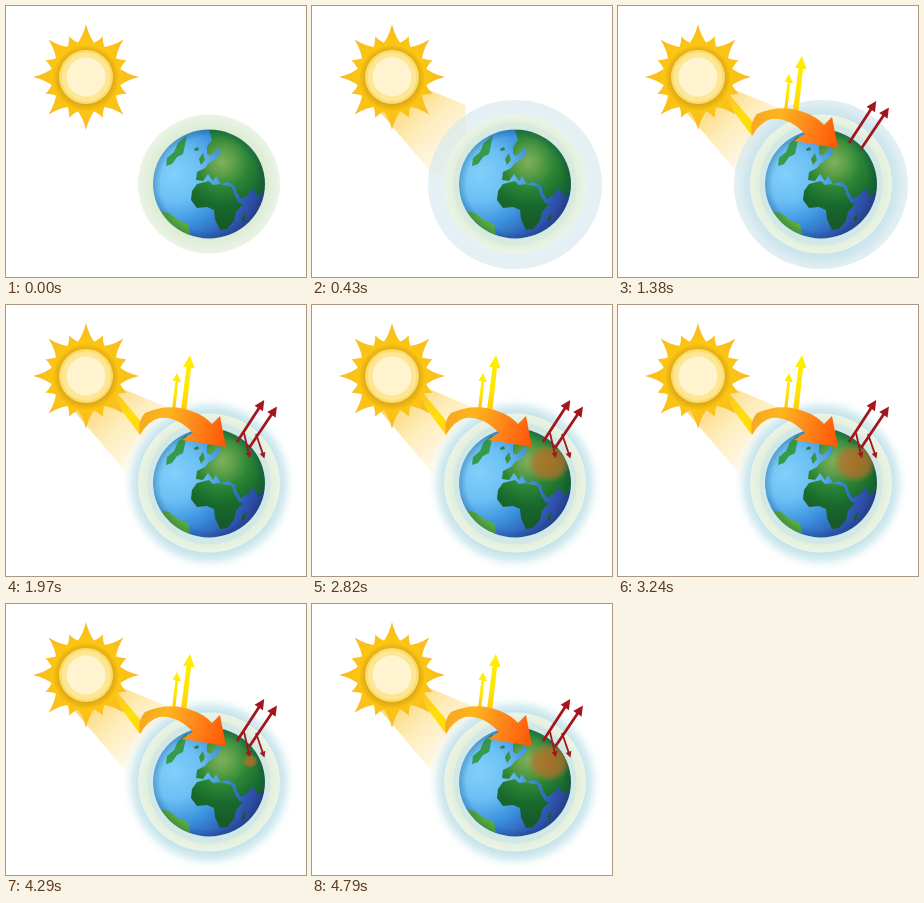
Write an HTML page without scripts that moves like this. It is 300 px wide and 271 px high and loops after 4920 ms.

```html
<!DOCTYPE html>
<html lang="en">
<head>
<meta charset="utf-8">
<title>Greenhouse effect</title>
<style>
html, body { margin: 0; width: 100%; height: 100%; overflow: hidden; background: #fff; }
svg { display: block; width: 100vw; height: 100vh; }

.beam, .sky, .crisp, .trace, .bounce, .rise, .leave, .heat { animation: 4.92s linear infinite both; }
.beam { animation-name: beam; }
.sky { animation-name: sky; }
.crisp { animation-name: soften; }
.trace { animation-name: trace; stroke-dasharray: 1 2; }
.rise { animation-name: rise; transform-box: fill-box; transform-origin: 50% 100%; }
.leave { animation-name: leave; transform-box: fill-box; transform-origin: 0 100%; }
.bounce { animation-name: bounce; transform-box: fill-box; transform-origin: 0 0; }
.heat { animation-name: heat; animation-timing-function: step-end; transform-origin: 248px 156.5px; }

@keyframes beam {
  0% { clip-path: inset(0 100% 100% 0); }
  2.642% { clip-path: inset(0 100% 100% 0); animation-timing-function: steps(4, jump-both); }
  9.6%, 100% { clip-path: inset(0); }
}
@keyframes sky {
  0% { opacity: 0; }
  2.642% { opacity: 0; animation-timing-function: steps(6, jump-both); }
  13.008%, 100% { opacity: 1; }
}
@keyframes trace {
  0% { stroke-dashoffset: 1.2; }
  7.9% { stroke-dashoffset: 1.2; animation-timing-function: steps(3, jump-both); }
  13.008% { stroke-dashoffset: .67; }
  13.618% { stroke-dashoffset: .67; animation-timing-function: steps(2, jump-both); }
  16.87%, 100% { stroke-dashoffset: 0; }
}
@keyframes rise {
  0% { transform: scaleY(0); }
  20.935% { transform: scaleY(0); animation-timing-function: steps(2, jump-both); }
  22.154%, 100% { transform: none; }
}
@keyframes leave {
  0% { transform: scale(0); }
  26.829% { transform: scale(0); animation-timing-function: steps(2, jump-both); }
  28.049%, 100% { transform: none; }
}
@keyframes bounce {
  0% { transform: scale(0); }
  35.976% { transform: scale(0); animation-timing-function: steps(2, jump-both); }
  40.041%, 100% { transform: none; }
}
@keyframes soften {
  0% { opacity: 1; }
  26.829% { opacity: 1; animation-timing-function: steps(2, jump-both); }
  28.049% { opacity: .6; animation-timing-function: step-end; }
  31.301% { opacity: .4; animation-timing-function: step-end; }
  35.976% { opacity: .4; animation-timing-function: steps(2, jump-both); }
  40.041%, 100% { opacity: 0; }
}
/* the warm spot swells, rests, then starts small again */
@keyframes heat {
  0% { transform: scale(0); }
  44.715%, 50.813%, 59.35%, 67.886%, 76.423%, 87.195%, 95.732% { transform: scale(.35); }
  45.935%, 52.033%, 60.569%, 69.106% { transform: scale(.55); }
  47.358%, 52.846%, 61.382%, 69.919%, 78.455% { transform: scale(.75); }
  54.065%, 62.602%, 71.138%, 79.878%, 88.618% { transform: scale(.9); }
  48.78%, 57.317%, 65.854%, 74.39%, 85.163%, 93.902%, 97.358%, 100% { transform: none; }
}
</style>
</head>
<body>
<svg viewBox="0 0 300 271" preserveAspectRatio="none">
  <defs>
    <radialGradient id="disc">
      <stop offset=".78" stop-color="#dba414"/><stop offset="1" stop-color="#fac213"/>
    </radialGradient>
    <radialGradient id="rays" gradientUnits="userSpaceOnUse" cx="0" cy="0" r="53">
      <stop offset=".6" stop-color="#fcc60f"/><stop offset="1" stop-color="#f8b92a"/>
    </radialGradient>
    <linearGradient id="light" gradientUnits="userSpaceOnUse" x1="90" y1="92" x2="142" y2="150">
      <stop offset="0" stop-color="#fcd878"/><stop offset=".45" stop-color="#feecba"/><stop offset="1" stop-color="#fffaee"/>
    </linearGradient>
    <radialGradient id="air" gradientUnits="userSpaceOnUse" cx="203" cy="178.500" r="88">
      <stop offset=".79" stop-color="#c3e3ea"/><stop offset=".87" stop-color="#d9eef2"/><stop offset="1" stop-color="#fff" stop-opacity="0"/>
    </radialGradient>
    <radialGradient id="mist">
      <stop offset=".78" stop-color="#dcecd3"/><stop offset=".9" stop-color="#e4f0de"/><stop offset="1" stop-color="#ebf4e6"/>
    </radialGradient>
    <radialGradient id="sea" gradientUnits="userSpaceOnUse" cx="168" cy="168" r="96">
      <stop offset="0" stop-color="#82d0fa"/><stop offset=".28" stop-color="#6cc0f5"/><stop offset=".55" stop-color="#3a90dc"/><stop offset=".8" stop-color="#2f56b0"/><stop offset="1" stop-color="#2a3a8c"/>
    </radialGradient>
    <radialGradient id="land" gradientUnits="userSpaceOnUse" cx="216" cy="156" r="62">
      <stop offset="0" stop-color="#80b05c"/><stop offset=".2" stop-color="#5c9f48"/><stop offset=".42" stop-color="#2c8636"/><stop offset=".7" stop-color="#186a2c"/><stop offset="1" stop-color="#175a2a"/>
    </radialGradient>
    <radialGradient id="shade">
      <stop offset=".86" stop-color="#0b3c6c" stop-opacity="0"/><stop offset="1" stop-color="#0b3c6c" stop-opacity=".28"/>
    </radialGradient>
    <radialGradient id="warm">
      <stop offset="0" stop-color="#bd6c24" stop-opacity=".85"/><stop offset=".65" stop-color="#b8702a" stop-opacity=".7"/><stop offset="1" stop-color="#b0782a" stop-opacity="0"/>
    </radialGradient>
    <linearGradient id="gold" x1="0" y1="0" x2="0" y2="1">
      <stop offset="0" stop-color="#fff000"/><stop offset=".6" stop-color="#ffe400"/><stop offset="1" stop-color="#fdc810"/>
    </linearGradient>
    <linearGradient id="tail" gradientUnits="userSpaceOnUse" x1="108" y1="86" x2="136" y2="128">
      <stop offset="0" stop-color="#fbc02c"/><stop offset=".6" stop-color="#ffe00a"/><stop offset="1" stop-color="#ffd60a"/>
    </linearGradient>
    <linearGradient id="ribbon" gradientUnits="userSpaceOnUse" x1="134" y1="112" x2="216" y2="138">
      <stop offset="0" stop-color="#f6a822"/><stop offset=".3" stop-color="#fdb41c"/><stop offset=".6" stop-color="#fd8c1c"/><stop offset="1" stop-color="#ff5a08"/>
    </linearGradient>
    <clipPath id="globe"><ellipse cx="203" cy="178" rx="56" ry="54.500"/></clipPath>
    <mask id="reveal" maskUnits="userSpaceOnUse" x="90" y="70" width="150" height="90">
      <path class="trace" pathLength="1" d="M104 80L134 130Q148 96 175 108L232 150" fill="none" stroke="#fff" stroke-width="50"/>
    </mask>
    <g id="spikes">
      <path d="M-10-32Q-3-40 0-53Q3-40 10-32Z"/>
      <path d="M-8-32Q-2-38 0-44Q2-38 8-32Z" transform="rotate(22.500)"/>
    </g>
    <g id="quad">
      <use href="#spikes"/><use href="#spikes" transform="rotate(45)"/>
    </g>
    <path id="ray" d="M-1.400 0V-40H-5L0-50 5-40H1.400V0Z"/>
    <path id="drop" d="M-.9 0V-20H-3L0-26 3-20H.9V0Z"/>
  </defs>

  <path class="beam" d="M68 106L105 79 175 108 160 190 129 178Z" fill="url(#light)"/>

  <!-- atmosphere -->
  <g class="sky">
    <circle cx="203" cy="178.500" r="88" fill="url(#air)"/>
    <ellipse class="crisp" cx="203" cy="178.500" rx="87" ry="84.500" fill="#cfe5ec"/>
  </g>
  <ellipse cx="203" cy="178" rx="71" ry="69.500" fill="url(#mist)"/>
  <circle class="sky" cx="203" cy="178" r="61.500" fill="#d2e8e6"/>

  <!-- earth -->
  <g clip-path="url(#globe)">
    <circle cx="203" cy="178" r="57" fill="url(#sea)"/>
    <g fill="url(#land)">
      <path d="M203 124L206 134 201 141 201 148 205 150 210 145 213 141 215 146 210 153 203 157 199 162 191 166 190 174 197 175 202 168 207 175 210 170 215 178 222 176 229 180 231 187 235 193 243 188 247 182 252 191 262 182V120Z"/>
      <path d="M191 178L203 175 207 179 214 178 226 181 229 190 233 197 237 198 230 206 228 215 221 223 214 224 209 213 208 204 201 201 191 202 185 194 186 185Z"/>
      <path d="M193 153l4-6 2 7-4 5zM235 213l5-7-2 10zM188 143l4-2 1 3-4 1z"/>
    </g>
    <path d="M181 129L172 137 168 146 161 152 160 160 166 158 171 151 177 148 179 139Z" fill="#37994a"/>
    <path d="M151 205L163 207 172 214 182 218 184 228 176 237 148 222Z" fill="#58ad38"/>
    <ellipse cx="203" cy="178" rx="56" ry="54.500" fill="url(#shade)"/>
    <ellipse class="heat" cx="237" cy="158" rx="22" ry="20" fill="url(#warm)"/>
  </g>

  <!-- reflected sunlight -->
  <g class="rise" fill="url(#gold)">
    <path d="M166 104L169.500 76H166.500L171 68 175 77H172L169.500 104Z"/>
    <path d="M174.500 109L180.500 62H177L184 50 188.500 63H185L180 109Z"/>
  </g>

  <!-- incoming sunlight -->
  <g mask="url(#reveal)">
    <path d="M106 82L137 119 134 130 111 99Z" fill="url(#tail)"/>
    <path d="M134 130Q131 116 139 108Q164 97 188 107Q199 111 206 119L214 111 220 142 176 135 187 128Q171 111 153 113Q142 116 134 130Z" fill="url(#ribbon)"/>
  </g>

  <!-- infrared -->
  <g fill="#a3161d">
    <g class="leave">
      <use href="#ray" transform="translate(231 137) rotate(33)"/>
      <use href="#ray" transform="translate(243 143) rotate(34)"/>
    </g>
    <g class="bounce">
      <use href="#drop" transform="translate(238 128) rotate(167)"/>
      <use href="#drop" transform="translate(250 129) rotate(161)"/>
    </g>
  </g>

  <!-- sun -->
  <g transform="translate(80 71)">
    <g fill="url(#rays)">
      <circle r="35"/>
      <use href="#quad"/><use href="#quad" transform="rotate(90)"/>
      <use href="#quad" transform="rotate(180)"/><use href="#quad" transform="rotate(270)"/>
    </g>
    <circle cy="1" r="33" fill="url(#disc)"/>
    <circle r="27" fill="#fbdc6c"/>
    <circle r="24.500" fill="#fde794"/>
    <circle r="19.500" fill="#fff4cf"/>
  </g>
</svg>
</body>
</html>
```
